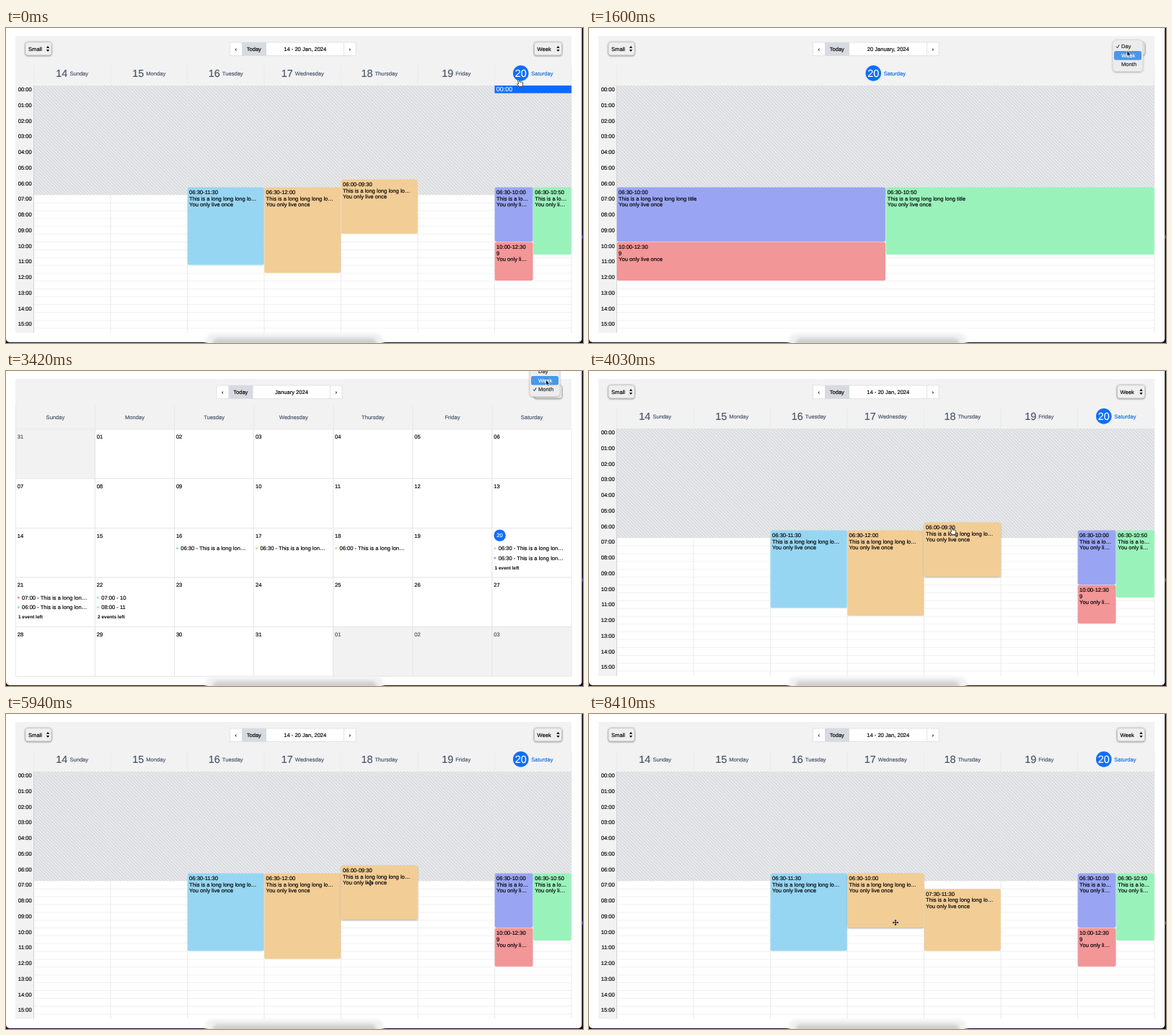
Recreate the animation shown at these times as an HTML page. Size 800x438 px, loop 8450 ms.

```html
<!DOCTYPE html>
<html lang="en">
<head>
<meta charset="utf-8">
<title>Calendar</title>
<style>
  html, body { margin: 0; width: 100%; height: 100%; overflow: hidden; background: #10101f; }
  svg { display: block; width: 800px; height: 438px; }
  text {
    font: 7.6px "Liberation Sans", Arial, sans-serif;
    fill: currentColor; stroke: currentColor; stroke-width: .16px;
    text-rendering: geometricPrecision; white-space: pre;
  }
  .mid { text-anchor: middle; }
  .slate { color: #475467; }
  .blue { color: #0f6fe8; }
  .big { font-size: 14.4px; }
  .more { font-size: 6.5px; font-weight: bold; stroke: none; }
  .hidden { display: none; }
</style>
</head>
<body>
<svg viewBox="0 0 800 438">
  <defs>
    <pattern id="hatch" width="3.26" height="3.26" patternUnits="userSpaceOnUse" patternTransform="rotate(-45)">
      <rect width="3.26" height="3.26" fill="#e9eaec"/>
      <rect width="1.4" height="3.26" fill="#d7d9dc"/>
    </pattern>
    <filter id="soft" x="-20%" y="-60%" width="140%" height="220%"><feGaussianBlur stdDeviation="2"/></filter>
    <filter id="low" x="-10%" y="-10%" width="120%" height="125%">
      <feDropShadow dx="0" dy="1" stdDeviation="1" flood-opacity=".3"/>
    </filter>
    <filter id="high" x="-10%" y="-10%" width="120%" height="125%">
      <feDropShadow dx="0" dy="2" stdDeviation="2.2" flood-opacity=".35"/>
    </filter>
    <filter id="button" x="-10%" y="-20%" width="120%" height="140%">
      <feDropShadow dx="0" dy=".5" stdDeviation=".8" flood-opacity=".7"/>
    </filter>
    <clipPath id="win"><rect x="0" y="-10" width="798.3" height="447" rx="5"/></clipPath>
  </defs>
  <rect x="798.3" y="288" width="1.7" height="5" fill="#3d3f86"/>
  <g clip-path="url(#win)">
    <rect width="800" height="438" fill="#fff"/>
    <g id="week"></g>
    <g id="day"></g>
    <g id="month"></g>
  </g>
  <g id="dock">
    <rect x="277" y="425" width="246" height="24" rx="9" fill="#f0f0f0" filter="url(#soft)"/>
    <rect x="286" y="431.5" width="228" height="20" rx="8" fill="#d0d0d0" filter="url(#soft)"/>
  </g>
  <g id="menu"></g>
  <g id="cursor">
    <circle id="ring" fill="none" stroke="#15171f" stroke-width="1.1"/>
    <path id="hand" fill="#fff" stroke="#222" stroke-width=".9" stroke-linejoin="round" transform="translate(.7 .6) scale(.92)"
      d="M-3.4-4.2Q-2.4-5.8-1.5-4.3L-.4-1.4Q2.6-2.2 4-.8Q5 1.2 3.8 3.4V5.3H-1Q-3.2 3.2-4.4 1.3Q-4 0-2.2.9Z"/>
    <path id="arrow" fill="#111" stroke="#fff" stroke-width=".7" d="M-1.5-4V4L.3 2.4L1.6 5.2L2.9 4.6L1.7 1.9H4Z"/>
    <g id="move" fill="none" stroke-linejoin="round" transform="scale(.88)">
      <path stroke="#fff" stroke-width="2.2" d="M-3.5 0H3.5M0-3.5V3.5"/>
      <path stroke="#111" stroke-width="1.2"
        d="M-3.5 0H3.5M0-3.5V3.5M-2.7-1.1L-4 0L-2.7 1.1M2.7-1.1L4 0L2.7 1.1M-1.1-2.7L0-4L1.1-2.7M-1.1 2.7L0 4L1.1 2.7"/>
    </g>
  </g>
</svg>
<script>
const LOOP = 8450, HOUR = 21.75, TOP = 80, LEFT = 38.5, RIGHT = 784, COL = (RIGHT - LEFT) / 7;
const DAYS = ["Sunday", "Monday", "Tuesday", "Wednesday", "Thursday", "Friday", "Saturday"];
const COLORS = { blue: "#97d6f2", orange: "#f2cd96", purple: "#99a5f2", green: "#9af2bb", red: "#f29698" };
const PANEL = "#f2f2f2", ACCENT = "#0d6efd";

const $ = id => document.getElementById(id);
const range = n => [...Array(n).keys()];
const two = n => String(n).padStart(2, "0");
const clock = h => two(Math.floor(h)) + ":" + two(Math.round(h % 1 * 60));
const hourY = h => TOP + HOUR * h;

const rect = (x, y, w, h, fill, extra = "") =>
  `<rect x="${x}" y="${y}" width="${w}" height="${h}" fill="${fill}" ${extra}/>`;
const label = (x, y, s, cls = "", extra = "") => `<text x="${x}" y="${y}" class="${cls}" ${extra}>${s}</text>`;
const line = (x1, y1, x2, y2, color) =>
  `<path d="M${x1} ${y1}L${x2} ${y2}" stroke="${color}" stroke-width=".8"/>`;

function select(x, w, s) {
  const ax = x + w - 5;
  return rect(x, 19.8, w, 18, "#efefef", 'rx="3.5" stroke="#c4c4c4" stroke-width=".6" filter="url(#button)"') +
    label(x + 4, 31.7, s) +
    `<path d="M${ax - 2.2} 27.9L${ax} 24.8L${ax + 2.2} 27.9ZM${ax - 2.2} 30L${ax} 33.1L${ax + 2.2} 30Z" fill="#111"/>`;
}

function nav(x, w, title) {
  const end = x + w;
  return rect(x, 20, w, 18.5, "#fff", 'stroke="#dcdde0" stroke-width=".8"') +
    rect(x + 16.5, 20, 34, 18.5, "#d7dbe1") + line(end - 16.5, 20, end - 16.5, 38.5, "#dcdde0") +
    label(x + 8.2, 31.6, "‹", "mid") + label(x + 33.3, 31.8, "Today", "mid") +
    label((x + 50.5 + end - 16.5) / 2, 31.8, title, "mid") + label(end - 8.2, 31.6, "›", "mid");
}

function todayHead(center) {
  const x = center - 17;
  return `<circle cx="${x}" cy="62.9" r="10.8" fill="${ACCENT}"/>` +
    label(x, 68, "20", "mid big", 'color="#fff"') + label(x + 14.4, 66, "Saturday", "blue");
}

function timeGrid(cols) {
  const w = (RIGHT - LEFT) / cols;
  let s = rect(13, 11, RIGHT - 13, 69, PANEL) + rect(13, 80, 25.5, 344, PANEL);
  range(32).filter(i => i > 14).forEach(i => s += line(LEFT, hourY(i / 2), RIGHT, hourY(i / 2), "#ececee"));
  s += rect(LEFT, TOP, RIGHT - LEFT, HOUR * 7, "url(#hatch)");
  range(cols + 1).forEach(i => {
    const x = LEFT + w * i;
    s += line(x, 52, x, 80, "#e9e9ea") + line(x, 80, x, 424, i ? "#e4e5e7" : "#c9cacc");
  });
  range(16).forEach(h => s += label(35.8, hourY(h) + 8, clock(h), "", 'text-anchor="end"'));
  return s + select(27, 36, "Small");
}

function event(x, w, start, end, color, lines, filter = "") {
  const y = hourY(start);
  return rect(x + .2, y, w - .4, (end - start) * HOUR - .6, COLORS[color], `rx="2.5" ${filter && `filter="url(#${filter})"`}`) +
    [clock(start) + "-" + clock(end), ...lines].map((s, i) => label(x + 2.6, y + 9.5 + 8.7 * i, s)).join("");
}

const ONCE = "You only live once";
const colX = i => LEFT + COL * i;

function buildWeek() {
  let s = timeGrid(7) + nav(310.5, 174.5, "14 - 20 Jan, 2024") + select(732.5, 38, "Week");
  DAYS.forEach((name, i) => {
    const c = colX(i + .5);
    s += i === 6 ? todayHead(c) : `<text x="${c}" y="68" class="mid slate"><tspan class="big">${14 + i}</tspan>` +
      `<tspan dx="3" dy="-2">${name}</tspan></text>`;
  });
  const x = colX(6), half = COL / 2, short = ["This is a lo…", "You only li…"];
  s += event(colX(2), COL, 6.5, 11.5, "blue", ["This is a long long long lo…", ONCE]) +
    event(x, half, 6.5, 10, "purple", short) + event(x + half, half, 6.5, 10 + 5 / 6, "green", short) +
    event(x, half, 10, 12.5, "red", ["9", short[1]]);
  return s + `<g id="slot">${rect(x, 80, COL, 10.6, "#0a6cff")}` +
    label(x + 2.3, 88.2, "00:00", "", 'color="#fff" style="font-size:9px"') + `</g><g id="live"></g>`;
}

function buildDay() {
  const half = (RIGHT - LEFT) / 2, text = ["This is a long long long long title", ONCE];
  return timeGrid(1) + nav(310.5, 174.5, "20 January, 2024") + select(732.5, 38, "Day") + todayHead(LEFT + half) +
    event(LEFT, half, 6.5, 10, "purple", text) + event(LEFT + half, half, 6.5, 10 + 5 / 6, "green", text) +
    event(LEFT, half, 10, 12.5, "red", ["9", ONCE]);
}

function buildMonth() {
  const x0 = 13.4, w = 110.1, y0 = 81, h = 68.7, long = " - This is a long lon…";
  const notes = {
    16: [["blue", "06:30" + long]], 17: [["orange", "06:30" + long]], 18: [["orange", "06:00" + long]],
    20: [["green", "06:30" + long], ["purple", "06:30" + long], "1 event left"],
    21: [["red", "07:00" + long], ["blue", "06:00" + long], "1 event left"],
    22: [["green", "07:00 - 10"], ["green", "08:00 - 11"], "2 events left"]
  };
  let s = rect(13, 11, RIGHT - 13, 70, PANEL) + nav(292, 174, "January 2024") + select(732.5, 38, "Month");
  range(35).forEach(i => {
    const x = x0 + w * (i % 7), y = y0 + h * Math.floor(i / 7), out = i < 1 || i > 31;
    const num = i < 1 ? 31 : i > 31 ? i - 31 : i;
    s += rect(x, y, w, h, out ? PANEL : "#fff", 'stroke="#e2e3e5" stroke-width=".8"');
    if (i === 20) s += `<circle cx="${x + 10.6}" cy="${y + 10.2}" r="8.2" fill="${ACCENT}"/>` +
      label(x + 10.6, y + 12.9, 20, "mid", 'color="#fff"');
    else s += label(x + 2.3, y + 13.3, two(num), out ? "slate" : "");
    (notes[i] || []).forEach((n, k) => {
      const ty = y + 30.7 + 13.5 * k;
      s += k === 2 ? label(x + 3.5, ty - .6, n, "more") :
        `<circle cx="${x + 3.9}" cy="${ty - 2.6}" r="1.6" fill="${COLORS[n[0]]}"/>` + label(x + 8.7, ty, n[1]);
    });
  });
  DAYS.forEach((name, i) => {
    const x = x0 + w * i;
    s += line(x, 48, x, 81, "#e4e5e7") + label(x + w / 2, 67, name, "mid slate");
  });
  const x = x0 + w * 6;
  return s + `<g id="hover">${rect(x + .4, 48, w, 32.6, "#fff", 'filter="url(#low)"')}` +
    label(x + w / 2, 67, "Saturday", "mid blue") + "</g>";
}

$("week").innerHTML = buildWeek();
$("day").innerHTML = buildDay();
$("month").innerHTML = buildMonth();

// Pointer stops: time, x, y
const PATH = [
  [0, 712, 76], [80, 712, 76], [350, 748, 29], [480, 748, 29], [760, 755, 15], [950, 755, 15],
  [1300, 748, 29], [1480, 748, 29], [1850, 746, 54], [2200, 746, 55], [2480, 748, 29], [2720, 748, 29],
  [3150, 750, 16], [3560, 750, 16], [4000, 504, 222], [4100, 504, 222], [4480, 440, 247.6],
  [4620, 440, 247.6], [5120, 440, 215], [5250, 440, 215], [5620, 440, 247.6], [5720, 440, 247.6],
  [5930, 505, 235], [6020, 505, 235], [6380, 505, 268], [6470, 505, 268], [6740, 501, 312],
  [6900, 501, 312], [7150, 501, 323], [7260, 501, 323], [7600, 425, 334], [7700, 425, 334],
  [8250, 425, 290], [8450, 425, 290]
];
const PRESSES = [[4550, 5700], [5960, 6450], [6800, 7240], [7640, 8360]];
const MENUS = [
  { open: 420, close: 810, current: 1 },
  { open: 1400, close: 1990, current: 0 },
  { open: 2640, close: 3470, current: 2 }
];
const FADE = 100;

function pointer(t) {
  const i = PATH.findIndex(p => p[0] > t), [t0, x0, y0] = PATH[i - 1], [t1, x1, y1] = PATH[i];
  const u = (t - t0) / (t1 - t0), k = u * u * (3 - 2 * u);
  return [x0 + (x1 - x0) * k, y0 + (y1 - y0) * k];
}

// Hours dragged so far, snapped to half hours
function dragged(t, i) {
  const [from, to] = PRESSES[i];
  if (t < from) return 0;
  return Math.round((pointer(Math.min(t, to))[1] - pointer(from)[1]) / HOUR * 2) / 2;
}

function liveEvents(t, x, y) {
  const down = i => t >= PRESSES[i][0] && t < PRESSES[i][1];
  const wedStart = 6.5 + dragged(t, 0), wedEnd = wedStart + 5.5 + dragged(t, 3);
  const thuStart = 6 + dragged(t, 1), thuEnd = thuStart + 3.5 + dragged(t, 2);
  const draw = (col, start, end, moving, sizing, ghost) => {
    const over = t > 3600 && x > colX(col) && x < colX(col + 1) && y > hourY(start) && y < hourY(end);
    const long = `This is a long long long lo${moving ? "n" : ""}…`;
    return (moving ? rect(colX(col) + .5, hourY(ghost[0]), COL - 1, ghost[1] * HOUR - .6, "#fff", 'stroke="#d3e7e9" rx="2"') : "") +
      event(colX(col), moving ? COL + 1 : COL, start, end, "orange", [long, ONCE], moving || sizing ? "high" : over ? "low" : "");
  };
  const wed = draw(3, wedStart, wedEnd, down(0), down(3), [6.5, 5.5]);
  const thu = draw(4, thuStart, thuEnd, down(1), down(2), [6, 3.5]);
  return down(0) || down(3) ? thu + wed : wed + thu;
}

function menuMarkup(m, y) {
  const top = 16.5 - 12.5 * m.current;
  let s = rect(726, top, 42, 44, "#ececec", 'rx="5" stroke="#cfcfcf" stroke-width=".6" filter="url(#low)"');
  ["Day", "Week", "Month"].forEach((name, i) => {
    const cy = top + 9.2 + 12.5 * i, on = Math.abs(y - cy) < 6.25, ink = on ? "#fff" : "#222";
    if (on) s += rect(728, cy - 6.2, 38, 12.4, "#4a97e8", 'rx="2.5"');
    if (i === m.current) s += `<path d="M731 ${cy}l1.6 2l2.6-4.4" fill="none" stroke="${ink}"/>`;
    s += label(738, cy + 2.7, name, "", `color="${ink}"`);
  });
  return s;
}

const show = (id, on) => $(id).classList.toggle("hidden", !on);
const cache = {};
function fill(id, html) {
  if (cache[id] !== html) $(id).innerHTML = cache[id] = html;
}

function render(t) {
  const [x, y] = pointer(t);
  const view = t < 900 ? "week" : t < 2080 ? "day" : t < 3540 ? "month" : "week";
  ["week", "day", "month"].forEach(v => show(v, v === view));
  show("slot", t < 130);
  show("hover", x > 674 && y > 47 && y < 81);
  fill("live", liveEvents(t, x, y));

  const menu = MENUS.find(m => t >= m.open && t < m.close + FADE);
  fill("menu", menu ? menuMarkup(menu, y) : "");
  $("menu").setAttribute("opacity", menu ? Math.min(1, 1 - (t - menu.close) / FADE) : 1);

  const press = PRESSES.find(([a, b]) => t >= a && t < b);
  const move = PRESSES.some(([a, b]) => t >= a - 60 && t < b + 90);
  show("ring", press);
  if (press) $("ring").setAttribute("r", 10.5 + 2.8 * Math.max(0, 1 - (t - press[0]) / 180));
  show("move", move);
  show("arrow", menu && !move);
  show("hand", !menu && !move);
  $("cursor").setAttribute("transform", `translate(${x} ${y})`);
}

const start = performance.now();
function tick() {
  render((performance.now() - start) % LOOP);
  requestAnimationFrame(tick);
}
tick();
</script>
</body>
</html>
```
